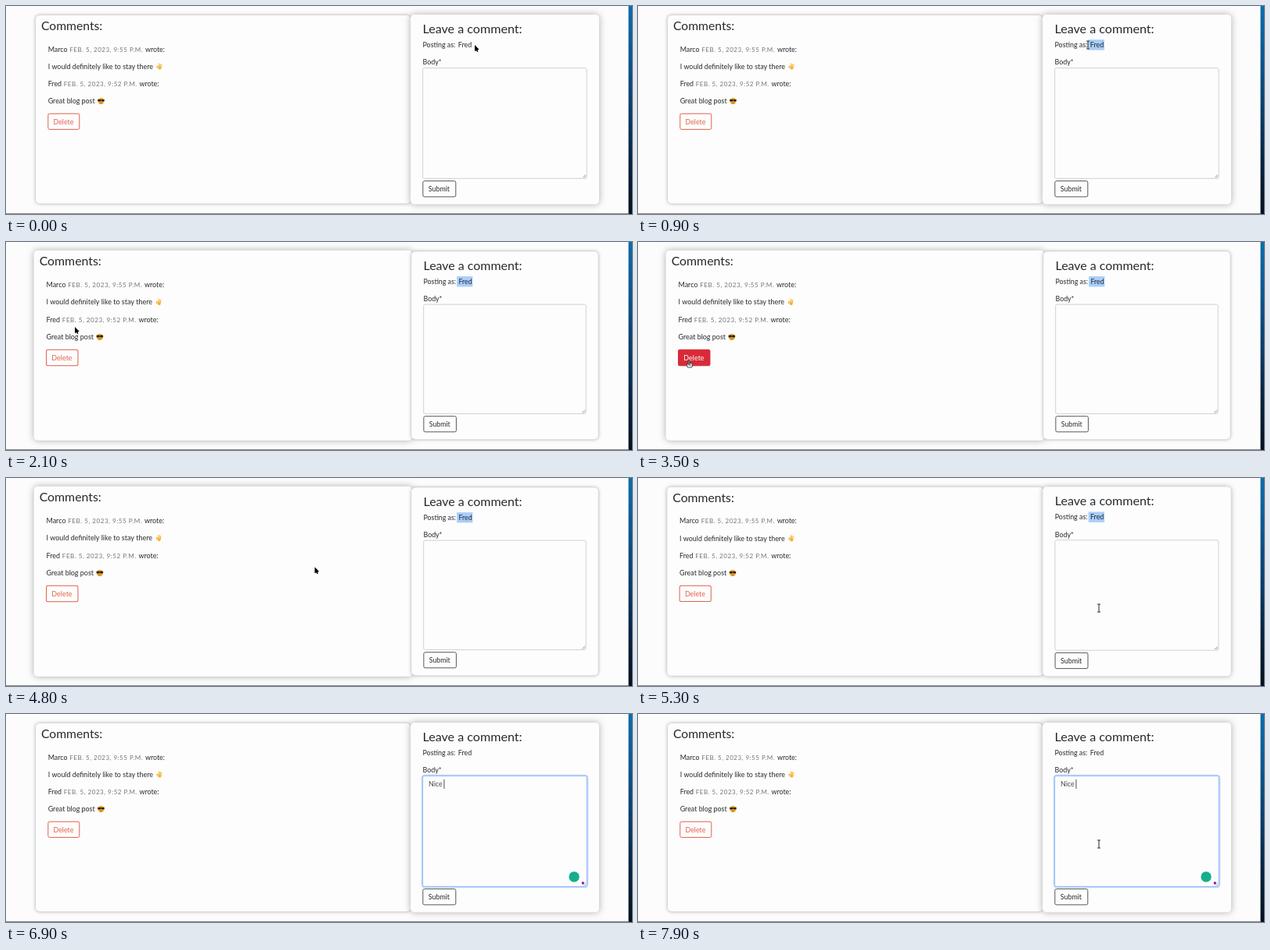
An HTML page with a canvas for the animation above (8000 ms loop, 800 px wide and 267 px high).

```html
<!DOCTYPE html>
<html lang="en">
<head>
<meta charset="utf-8">
<title>Comments</title>
<style>
html, body { margin: 0; width: 100%; height: 100%; overflow: hidden; background: #fcfcfc; }
canvas { display: block; }
</style>
</head>
<body>
<canvas id="stage" width="800" height="267"></canvas>
<script>
const ctx = document.getElementById('stage').getContext('2d');
const LOOP = 8000;
const SIZE = 8.9, GAP = 2.8;
const INK = '#25292d', MUTED = '#70767c', RED = '#e2604c', PAPER = '#fdfdfd';
const POSTER = 'Fred', MESSAGE = 'Nice ';
const FOCUS = 5400, TYPE_START = 5900, KEY_GAP = 190;

const MOVES = [
  { start: 600, end: 900, to: [575, 50] },
  { start: 1560, end: 1700, to: [304, 129.5] },
  { start: 1700, end: 2100, to: [88, 109] },
  { start: 2500, end: 3200, to: [65, 152] },
  { start: 4350, end: 4800, to: [394, 114] },
  { start: 4800, end: 5200, to: [589, 167] }
];

const mix = (a, b, p) => a + (b - a) * p;
const linear = (t, start, end) => Math.min(1, Math.max(0, (t - start) / (end - start)));
const ease = (t, start, end) => {
  const p = linear(t, start, end);
  return p * p * (3 - 2 * p);
};

function pointerAt(t) {
  return MOVES.reduce(([x, y], { start, end, to }) => {
    const p = linear(t, start, end);
    return [mix(x, to[0], p), mix(y, to[1], p)];
  }, [599, 50]);
}

// Draws text and returns the x where it ends
function text(str, x, y, { size = SIZE, color = INK, spacing = 0 } = {}) {
  ctx.font = `${size}px Lato, "Open Sans", sans-serif`;
  ctx.letterSpacing = spacing + 'px';
  ctx.fillStyle = color;
  ctx.fillText(str, x, y);
  return x + ctx.measureText(str).width;
}

function box(x, y, w, h, r, fill, stroke, width = 1) {
  ctx.beginPath();
  ctx.roundRect(x, y, w, h, r);
  if (fill) { ctx.fillStyle = fill; ctx.fill(); }
  if (stroke) { ctx.strokeStyle = stroke; ctx.lineWidth = width; ctx.stroke(); }
}

function disc(x, y, r, color) {
  ctx.beginPath();
  ctx.arc(x, y, r, 0, Math.PI * 2);
  ctx.fillStyle = color;
  ctx.fill();
}

function line(x1, y1, x2, y2, color, width = 1) {
  ctx.beginPath();
  ctx.moveTo(x1, y1);
  ctx.lineTo(x2, y2);
  ctx.strokeStyle = color;
  ctx.lineWidth = width;
  ctx.stroke();
}

function card(x, y, w, h, hover) {
  ctx.save();
  ctx.shadowColor = `rgba(0,0,0,${mix(0.36, 0.32, hover)})`;
  ctx.shadowBlur = mix(4, 8, hover);
  box(x, y, w, h, 5, PAPER);
  ctx.restore();
}

function scaled(cx, cy, s, draw) {
  ctx.save();
  ctx.translate(cx, cy);
  ctx.scale(s, s);
  ctx.translate(-cx, -cy);
  draw();
  ctx.restore();
}

function okHand(x, y) {
  for (let i = 0; i < 3; i++) {
    line(x + i * 1.2, y + 1.5, x + i * 1.5, y - 4.2 + i * 0.6, '#f8bf45', 1.1);
  }
  disc(x + 0.9, y + 2, 2.1, '#f5b53b');
  disc(x - 1.5, y + 0.6, 1.8, '#f3ae34');
  disc(x - 1.5, y + 0.6, 0.8, PAPER);
}

function coolFace(x, y) {
  disc(x, y, 4.2, '#f4ae35');
  for (const side of [-1, 1]) box(x + side * 2.2 - 2, y - 2, 4, 2.6, 1, '#2a211c');
  line(x - 4.2, y - 1.6, x + 4.2, y - 1.6, '#2a211c', 0.8);
  line(x - 1.5, y + 2.3, x + 1.5, y + 2.3, '#8a4a1c', 0.8);
}

function comment(y, name, time, body, emoji) {
  const left = 53.7;
  let x = text(name, left, y) + GAP;
  x = text(`FEB. 5, 2023, ${time} P.M.`, x, y, { size: 8, color: MUTED, spacing: 0.5 }) + GAP;
  text('wrote:', x, y);
  emoji(text(body, left, y + 22.2) + GAP + 5, y + 19);
}

function comments(hover, overDelete) {
  card(38, 12, 479, 241.5, hover);
  text('Comments:', 45, 30.8, { size: 15.7 });
  comment(58.6, 'Marco', '9:55', 'I would definitely like to stay there', okHand);
  comment(103, POSTER, '9:52', 'Great blog post', coolFace);
  const fill = overDelete && '#d82a38';
  box(53.8, 138.2, 40, 20.2, 2, fill, fill || RED);
  text('Delete', 60.5, 151.5, { color: fill ? '#fff' : RED });
}

function form(t, hover) {
  const focused = t >= FOCUS;
  card(517, 11, 241, 243.5, hover);
  text('Leave a comment:', 532.5, 35, { size: 16.1 });

  if (!focused) {
    const width = 20.5 * linear(t, 600, 900);
    ctx.fillStyle = '#a9cefb';
    ctx.fillRect(596 - width, 43.2, width, 13.4);
  }
  text('Posting as:', 532.5, 52.9);
  text(POSTER, 577.8, 52.9);
  text('Body*', 532.5, 75.4);

  if (focused) box(532.5, 79.5, 210, 142, 2.5, null, '#bad3fc', 3.4);
  box(532.6, 79.6, 209.6, 141.8, 2, PAPER, focused ? '#98bdf7' : '#d0d2d4');
  for (const d of [1.8, 3.8]) line(741 - d, 220.3, 741, 220.3 - d, '#777', 0.7);
  if (focused) typing(t);

  box(532.8, 224.6, 42, 20.3, 2, null, '#55585b');
  text('Submit', 539.8, 238);
}

function typing(t) {
  const since = t - TYPE_START;
  const count = Math.min(MESSAGE.length, Math.max(0, Math.floor(since / KEY_GAP) + 1));
  const end = text(MESSAGE.slice(0, count), 540, 93.2, { color: '#40454a' });
  const idle = count ? since - (count - 1) * KEY_GAP : t - FOCUS;
  if (idle % 1000 < 500) line(end, 84, end, 96, '#222', 0.8);

  if (t < 5600) return;
  disc(726, 209, 6.7, '#15ae8c');
  const shrink = ease(t, 6500, 6700);
  const x = mix(732, 737.3, shrink), y = mix(212, 217, shrink), r = mix(6.6, 1.7, shrink);
  disc(x, y, r + 1, '#fff');
  disc(x, y, r, '#7a1aa0');
}

function arrow() {
  ctx.beginPath();
  ctx.moveTo(0, 0);
  ctx.lineTo(0, 8);
  ctx.lineTo(5.6, 5.8);
  ctx.closePath();
  ctx.lineJoin = 'round';
  ctx.strokeStyle = '#fff';
  ctx.lineWidth = 1.2;
  ctx.stroke();
  ctx.fillStyle = '#000';
  ctx.fill();
  line(2.2, 5, 3.7, 8.8, '#000', 1.5);
}

function hand() {
  box(-2.4, 3.6, 7, 5.4, 2, '#fff', '#111', 0.8);
  box(-0.8, 0, 1.6, 6, 0.8, '#fff', '#111', 0.8);
  for (const x of [1.4, 2.9]) line(x, 4.6, x, 7.4, '#333', 0.5);
}

function beam() {
  line(0, -5, 0, 5, '#222');
  for (const y of [-5, 5]) line(-2, y, 2, y, '#222', 0.9);
}

function pointer(t, x, y, overDelete) {
  if (t >= TYPE_START && t < 6950) return;
  const selecting = t > 600 && t < 1150;
  const inField = x > 533 && y > 80;
  ctx.save();
  ctx.translate(x, y);
  (overDelete ? hand : selecting || inField ? beam : arrow)();
  ctx.restore();
}

function backdrop() {
  ctx.fillStyle = '#fcfcfc';
  ctx.fillRect(0, 0, 800, 267);
  ctx.fillStyle = '#858585';
  ctx.fillRect(0, 266, 795, 1);
  const sky = ctx.createLinearGradient(0, 0, 0, 267);
  ['#0c6cab', '#0b558f', '#0a3c6b', '#06213f', '#04111f']
    .forEach((color, i, all) => sky.addColorStop(i / (all.length - 1), color));
  ctx.fillStyle = sky;
  ctx.fillRect(795.5, 0, 5, 267);
}

function render(t) {
  const [x, y] = pointerAt(t);
  const hover = ease(t, 1570, 1970) - ease(t, 5040, 5440);
  const overDelete = x > 51 && x < 92 && y > 138 && y < 159;
  backdrop();
  scaled(277.5, 132.7, 1 + 0.01 * hover, () => comments(hover, overDelete));
  scaled(637.5, 132.7, 1 - 0.01 * hover, () => form(t, 1 - hover));
  pointer(t, x, y, overDelete);
}

const start = performance.now();
function tick() {
  render((performance.now() - start) % LOOP);
  requestAnimationFrame(tick);
}
tick();
</script>
</body>
</html>
```
